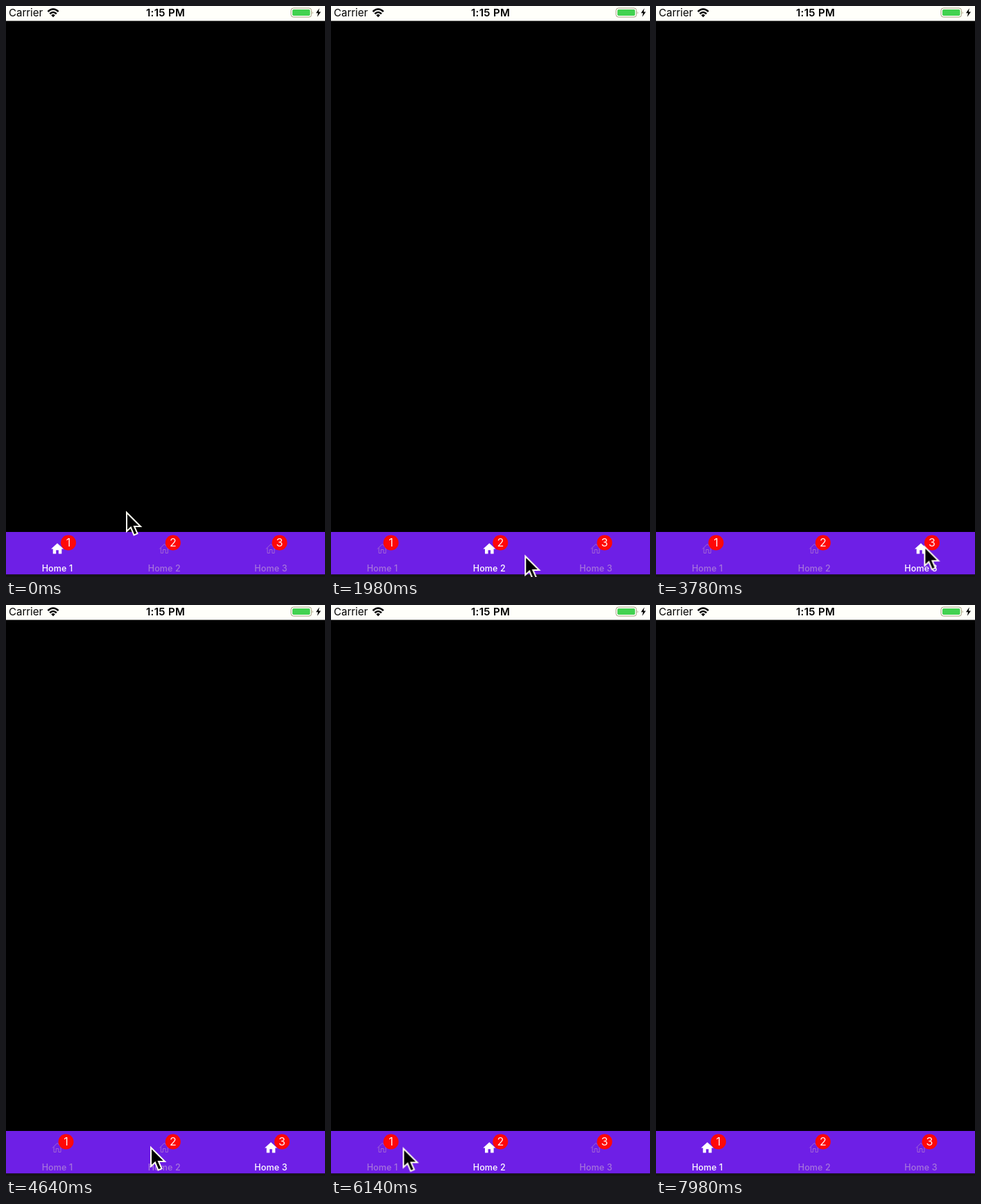
Write an HTML page that moves like this. It is 460 by 824 pixels and loops after 8 s.

```html
<!DOCTYPE html>
<html lang="en">
<head>
<meta charset="utf-8">
<title>Tab bar</title>
<style>
html, body { margin: 0; width: 100%; height: 100%; overflow: hidden; background: #000; }
svg { display: block; font-family: Inter, Roboto, sans-serif; }

.status { font-size: 15px; fill: #000; }
.time { font-weight: 600; letter-spacing: .3px; text-anchor: middle; }

.tab { --on: 0; color: #a574dc; animation: 8s step-end infinite; }
.one { animation-name: one; }
.two { animation-name: two; }
.three { animation-name: three; }
.solid { opacity: var(--on); }
.outline { opacity: calc(1 - var(--on)); }
.badge { transform: translateX(calc(var(--on) * 3.5px)); }
.badge circle { fill: #ff0808; }
.badge text { font-size: 16px; fill: #fff0ee; text-anchor: middle; }
.label { font-size: 12.5px; font-weight: 500; letter-spacing: .15px; fill: currentColor; text-anchor: middle; }

/* Selected tab over time */
@keyframes one {
  0%, 88%, 100% { --on: 1; color: #fff; }
  15% { --on: 0; color: #a574dc; }
}
@keyframes two {
  0%, 39.5%, 88%, 100% { --on: 0; color: #a574dc; }
  15%, 63% { --on: 1; color: #fff; }
}
@keyframes three {
  0%, 63%, 100% { --on: 0; color: #a574dc; }
  39.5% { --on: 1; color: #fff; }
}

/* Rest on each tab, then glide to the next */
.cursor { animation: roam 8s ease-in-out infinite; }
@keyframes roam {
  0% { transform: translate(174px, 731px); }
  10.5% { transform: translate(222px, 782px); }
  18% { transform: translate(226px, 784px); animation-timing-function: ease-in; }
  24.75% { transform: translate(280px, 794px); animation-timing-function: ease-out; }
  36%, 41% { transform: translate(385px, 779px); }
  50% { transform: translate(388px, 781px); }
  58%, 63.5% { transform: translate(209px, 783px); animation-timing-function: ease-in; }
  69.75% { transform: translate(137px, 787px); animation-timing-function: ease-out; }
  80%, 88.5% { transform: translate(99px, 784px); animation-timing-function: ease-in; }
  92.75%, 100% { transform: translate(114px, 832px); }
}
</style>
</head>
<body>
<svg width="460" height="824" viewBox="0 0 460 824">
  <defs>
    <path id="solid" fill="#fff" transform="translate(-10.8 -10.4) scale(.9)"
      d="M10 20v-6h4v6h5v-8h3L12 3 2 12h3v8z"/>
    <path id="outline" fill="none" stroke="#a265d5"
      d="M-7 .5L0 -6.5L7 .5M-5 -1V6.5H-1.8V1.5H1.8V6.5H5V-1M4 -3V-6"/>
    <g id="icons">
      <use class="outline" href="#outline"/>
      <use class="solid" href="#solid"/>
    </g>
  </defs>

  <rect width="460" height="824"/>

  <g class="status">
    <rect width="460" height="21.5" fill="#fffffa"/>
    <text x="4" y="15">Carrier</text>
    <g fill="none" stroke="#000" stroke-width="2.6">
      <path d="M60.4 8.1Q68 .9 75.6 8.1"/>
      <path d="M63.2 11.2Q68 6.8 72.8 11.2"/>
    </g>
    <path d="M65.2 13.2Q68 10.8 70.8 13.2L68 16.2z"/>
    <text class="time" x="230" y="15">1:15 PM</text>
    <rect x="411" y="3" width="29.5" height="13" rx="3.5" fill="none" stroke="#a6a282"/>
    <rect x="413" y="5" width="25.5" height="9" rx="1.8" fill="#42d250"/>
    <path d="M441.8 7.5q1.8 2 0 4z" fill="#a6a282"/>
    <path d="M451.8 3.2L447 10.2H450L448.8 15.8L454 8.4H450.8z"/>
  </g>

  <rect y="759" width="460" height="61.5" fill="#6e1fe6"/>
  <rect y="820.5" width="460" height="3.5" fill="#141414"/>

  <g transform="translate(74 783)">
    <g class="tab one">
      <use href="#icons"/>
      <g class="badge"><circle cx="12.5" cy="-8.5" r="11"/><text x="12.5" y="-2.8">1</text></g>
      <text class="label" y="32.7">Home 1</text>
    </g>
  </g>
  <g transform="translate(228.3 783)">
    <g class="tab two">
      <use href="#icons"/>
      <g class="badge"><circle cx="12.5" cy="-8.5" r="11"/><text x="12.5" y="-2.8">2</text></g>
      <text class="label" y="32.7">Home 2</text>
    </g>
  </g>
  <g transform="translate(382 783)">
    <g class="tab three">
      <use href="#icons"/>
      <g class="badge"><circle cx="12.5" cy="-8.5" r="11"/><text x="12.5" y="-2.8">3</text></g>
      <text class="label" y="32.7">Home 3</text>
    </g>
  </g>

  <path class="cursor" stroke="#fffff0" stroke-width="2"
    d="M0 0V27L6 21.5L10.5 32.5L15.5 30.3L11 20H20z"/>
</svg>
</body>
</html>
```
